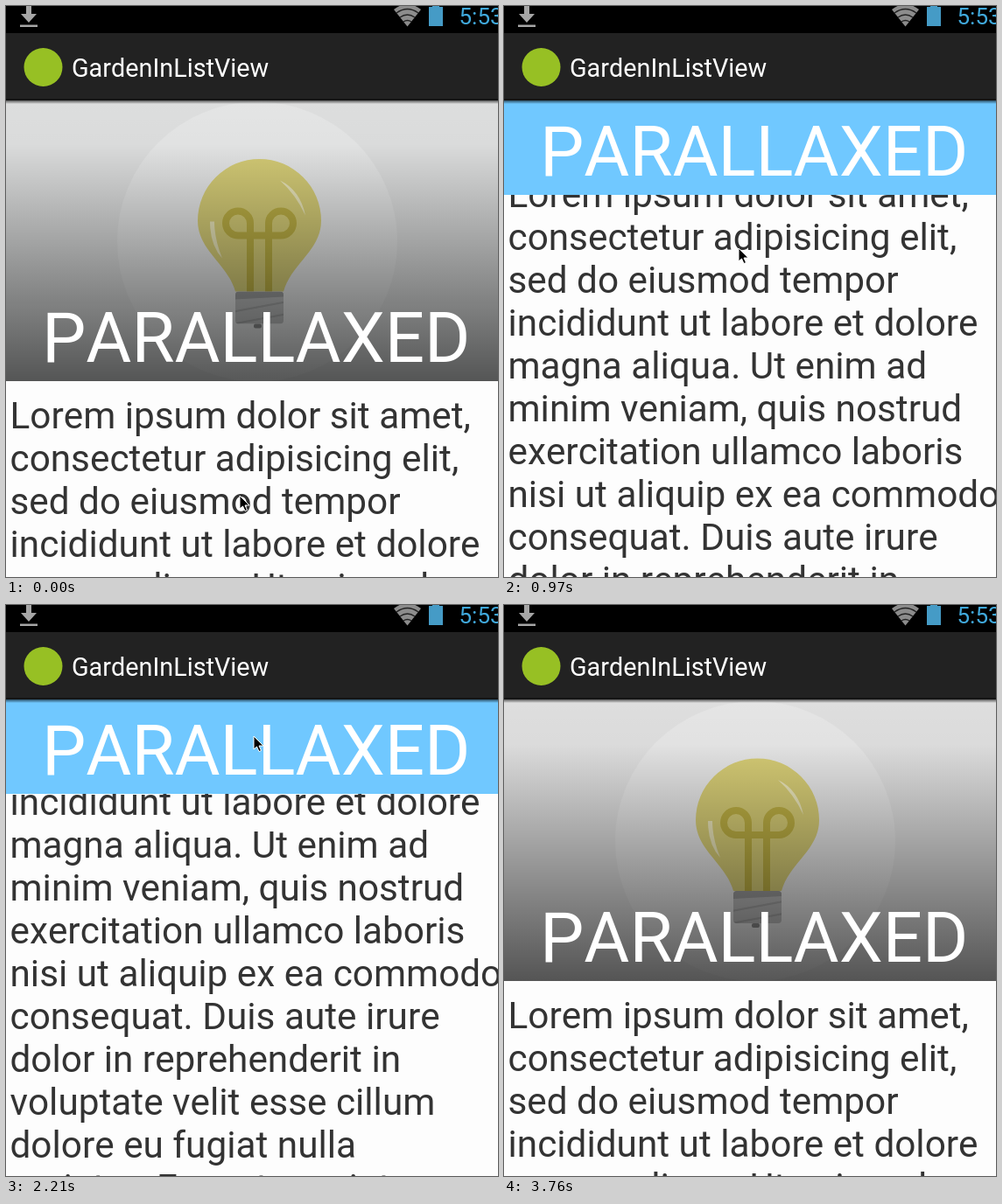
An HTML page that plays this animation: 562x653 px, repeating every 4890 ms.

```html
<!DOCTYPE html>
<html lang="en">
<head>
<meta charset="utf-8">
<title>Parallax list header</title>
<style>
  html, body { margin: 0; width: 100%; height: 100%; overflow: hidden; background: #fdfdfd; }
  svg { display: block; width: 562px; height: 653px; }
  text { font-family: Roboto, sans-serif; font-kerning: none; white-space: pre; }
  #body { font-size: 42.3px; fill: #333; }
  #title { font-size: 79.8px; fill: #fff; }
</style>
</head>
<body>
<svg viewBox="0 0 562 653">
  <defs>
    <linearGradient id="scrim" x1="0" y1="0" x2="0" y2="1">
      <stop offset="0" stop-opacity="0"/>
      <stop offset=".16" stop-opacity=".015"/>
      <stop offset="1" stop-opacity=".62"/>
    </linearGradient>
    <linearGradient id="shade" x1="0" y1="0" x2="0" y2="1">
      <stop offset="0" stop-opacity=".6"/>
      <stop offset="1" stop-opacity="0"/>
    </linearGradient>
    <linearGradient id="edge">
      <stop offset="0" stop-color="#33a5d5" stop-opacity="0"/>
      <stop offset=".5" stop-color="#33a5d5"/>
      <stop offset="1" stop-color="#33a5d5" stop-opacity="0"/>
    </linearGradient>
    <clipPath id="headerClip"><rect id="clipRect" y="108" width="562" height="322"/></clipPath>
    <clipPath id="baseClip"><rect x="262" y="327" width="55" height="37" rx="4"/></clipPath>
  </defs>

  <rect width="562" height="653" fill="#fdfdfd"/>
  <g id="body"></g>

  <g clip-path="url(#headerClip)">
    <g id="picture">
      <rect y="108" width="562" height="322" fill="#dedede"/>
      <circle cx="287" cy="270" r="160" fill="#e5e5e5"/>
      <path d="M262 327C253 295 219 280 219 246A70.500 70.500 0 0 1 360 246C360 280 326 295 317 327Z" fill="#d6cc75"/>
      <path d="M279 327V249A14 14 0 1 0 265 263H314A14 14 0 1 0 300 249V327"
            fill="none" stroke="#bdaf43" stroke-width="8"/>
      <g fill="#fff" opacity=".5">
        <path d="M313 200Q336 211 342 240Q331 216 313 200Z"/>
        <path d="M233 247Q233 274 247 289Q238 267 238 247Z"/>
      </g>
      <g clip-path="url(#baseClip)">
        <rect x="262" y="327" width="55" height="37" fill="#b9b9b9"/>
        <path d="M262 327H317V333L262 336Z" fill="#9c9c9c"/>
        <path d="M260 350L319 339M260 364L319 353" stroke="#a4a4a4" stroke-width="2"/>
      </g>
      <rect x="283" y="364" width="9" height="5" rx="2" fill="#8c8c8c"/>
    </g>
    <rect id="scrimRect" y="108" width="562" height="322" fill="url(#scrim)"/>
    <rect id="tint" y="108" width="562" height="322" fill="#70c8ff"/>
  </g>
  <text id="title" x="41">PARALLAXED</text>

  <rect id="glow" x="20" y="108" width="538" height="3" fill="url(#edge)"/>
  <rect y="108" width="562" height="4" fill="url(#shade)"/>

  <rect width="562" height="31" fill="#000"/>
  <rect y="31" width="562" height="77" fill="#222"/>
  <rect y="106" width="562" height="2" fill="#141414"/>
  <circle cx="42.500" cy="70" r="22" fill="#97c024"/>
  <text x="75" y="81" font-size="28.800" fill="#fff">GardenInListView</text>

  <g fill="#a6a6a6">
    <path d="M23 0H29V9H35L26 19L17 9H23Z"/>
    <rect x="16" y="21.500" width="20" height="2.500"/>
  </g>
  <path d="M458.500 23.500L443 4Q458.500 -8 474 4Z" fill="#8c8c8c"/>
  <path d="M446 8Q458.500 -1 471 8M450 13Q458.500 7 467 13M454 18Q458.500 15 463 18"
        fill="none" stroke="#222" stroke-width="1.500"/>
  <rect x="483" y="1" width="16" height="22" fill="#459bc6"/>
  <rect x="487" width="8" height="2" fill="#459bc6"/>
  <text x="517.500" y="21" font-size="26" fill="#40a9dc">5:53</text>

  <path id="cursor" d="M0 0V15L3.500 12L6 17.500L8.500 16.500L6 11H11Z" fill="#000" stroke="#fff"/>
</svg>

<script>
const LOOP = 4890, STEP = 60, PHASE = 20;
const TOP = 108, FULL = 322, TRAVEL = 214;
const LINE = 49, BASELINE = 484;
const $ = id => document.getElementById(id);

const lines = [
  'Lorem ipsum dolor sit amet,', 'consectetur adipisicing elit,',
  'sed do eiusmod tempor', 'incididunt ut labore et dolore',
  'magna aliqua. Ut enim ad', 'minim veniam, quis nostrud',
  'exercitation ullamco laboris', 'nisi ut aliquip ex ea commodo',
  'consequat. Duis aute irure', 'dolor in reprehenderit in',
  'voluptate velit esse cillum', 'dolore eu fugiat nulla',
  'pariatur. Excepteur sint'
];
lines.forEach((line, i) => {
  const text = document.createElementNS('http://www.w3.org/2000/svg', 'text');
  text.setAttribute('x', 4.5);
  text.setAttribute('y', BASELINE + i * LINE);
  text.textContent = line;
  $('body').append(text);
});

const shift = (id, x, y) => $(id).setAttribute('transform', `translate(${x} ${y})`);

function draw(time) {
  const t = Math.floor((time % LOOP - PHASE) / STEP) * STEP + PHASE;
  const ramp = (start, end) => Math.min(1, Math.max(0, (t - start) / (end - start)));

  // Legs of the upward drag, then of the pull back down
  const up = ramp(20, 740), slow = ramp(740, 1160), flick = ramp(1160, 1400);
  const down = ramp(2220, 2600), settle = ramp(2600, 2830), leave = ramp(2600, 3020);

  const scroll = Math.round(1 + 205 * up + 112 * slow + 73 * flick - 243 * down - 148 * settle);
  const x = 267 - 10 * up + 25 * slow + flick - 34 * down + 14 * leave;
  const y = 560 - 231 * up - 122 * slow - 57 * flick + 267 * down + 276 * leave;
  const hidden = Math.min(scroll, TRAVEL);

  shift('body', 0, -scroll);
  shift('picture', 0, -hidden / 2);
  shift('scrimRect', 0, -hidden);
  shift('cursor', Math.round(x), Math.round(y));
  $('clipRect').setAttribute('height', FULL - hidden);
  $('tint').setAttribute('opacity', hidden / TRAVEL);
  $('title').setAttribute('y', TOP + FULL - hidden - 22);
  $('glow').setAttribute('opacity', 0.8 * ramp(2720, 2840) * (1 - ramp(2840, 3740)));
}

const begin = performance.now();
function tick() {
  draw(performance.now() - begin);
  requestAnimationFrame(tick);
}
tick();
</script>
</body>
</html>
```
